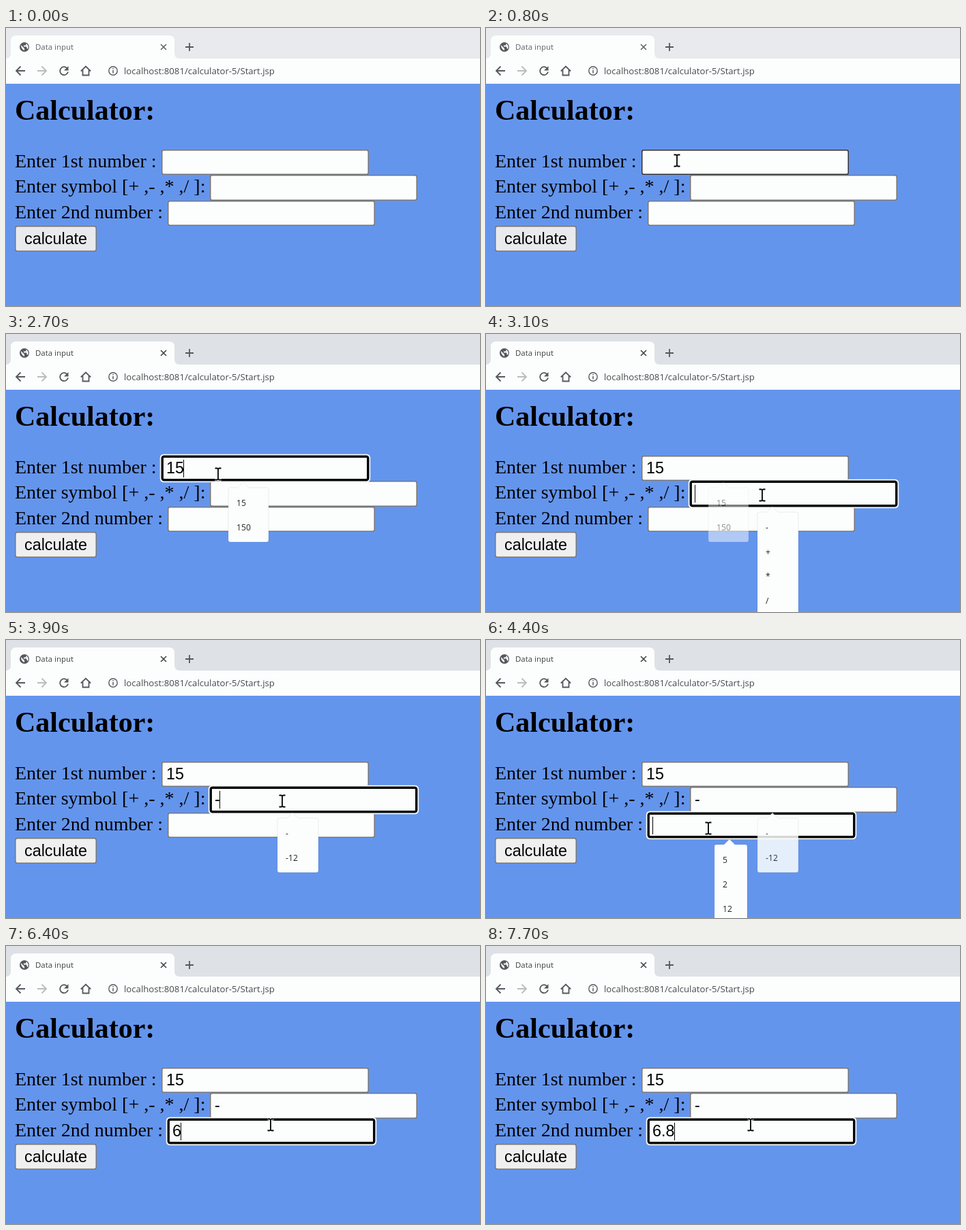
Animation, 695 px wide and 409 px high, one loop 8000 ms. Source, as an HTML page:

```html
<!DOCTYPE html>
<html lang="en">
<head>
<meta charset="utf-8">
<title>Data input</title>
<style>
  html, body { margin: 0; width: 100%; height: 100%; overflow: hidden; }
  svg { display: block; }
  text { white-space: pre; }
  .ui { font-family: "Open Sans", "Noto Sans", sans-serif; }
  .label { font: 28px "Liberation Serif", serif; }
  .heading { font: bold 42px "Liberation Serif", serif; }
  .control { font: 23.33px "Liberation Sans", sans-serif; }
  .item { font-size: 12.2px; fill: #222; }
  .icon { fill: none; stroke: #55585c; stroke-width: 1.8; }
</style>
</head>
<body>
<svg width="695" height="409" viewBox="0 0 695 409">
  <rect id="strip" width="695" height="46"/>
  <path d="M0 45Q7 45 7 37V19Q7 11 15 11H239Q247 11 247 19V37Q247 45 255 45H695V82H0Z" fill="#fcfefe"/>
  <rect y="82" width="695" height="327" fill="#6495ed"/>

  <circle cx="27" cy="28" r="7" fill="#55585c"/>
  <path d="M22 25l5 5v3q-5-2-5-8zM26 22.500h4l-1 3h-3v2h4l1 3h1.500q1-5-3-8z" fill="#fcfefe"/>
  <text id="title" class="ui" x="43" y="32" font-size="11.45">Data input</text>
  <g class="icon">
    <path id="close" d="M227 24l8 8m0-8l-8 8" stroke-width="1.6"/>
    <path d="M263 28h12m-6-6v12"/>
    <path d="M28 63H15m6.500-6.500L15 63l6.500 6.500"/>
    <path d="M46 63h13m-6.500-6.500L59 63l-6.500 6.500" stroke="#b9bbbe"/>
    <path d="M89.500 59A6 6 0 1 0 91 64.500"/>
    <path d="M91.500 56v6.500H85z" fill="#55585c" stroke="none"/>
    <path d="M109.800 63.500l7.200-7 7.200 7M112.500 62v7.500h9V62"/>
    <circle cx="157" cy="63" r="6.200" stroke-width="1.4"/>
    <path d="M157 62v4.500m0-7.500v1.600" stroke-width="1.5"/>
  </g>
  <text class="ui" x="173" y="68" font-size="13.2" fill="#46494d">localhost:8081/calculator-5/Start.jsp</text>

  <text class="heading" x="13" y="135">Calculator:</text>
  <g class="label">
    <text x="13" y="205">Enter 1st number :</text>
    <text x="13" y="242">Enter symbol [+ ,- ,* ,/ ]:</text>
    <text x="13" y="280">Enter 2nd number :</text>
  </g>
  <rect id="button" x="13.750" y="291.750" width="118.500" height="36.500" rx="3" stroke="#767676" stroke-width="1.5"/>
  <text class="control" x="27" y="318">calculate</text>
  <g id="live"></g>
</svg>
<script>
const $ = id => document.getElementById(id);
const LOOP = 8000, STEP = 100;

const fields = [
  { x: 228, y: 179, h: 37, menu: { x: 326, y: 226, tip: 348 } },
  { x: 299, y: 216, h: 38, menu: { x: 398, y: 262, tip: 420 } },
  { x: 237, y: 254, h: 37, menu: { x: 335, y: 301, tip: 357 } }
];

// Each action focuses or types: time, field, text, menu width, menu items
const actions = [
  [900, 0, '', 72, ['5', '-3', '2', '1000', '-10', '15']],
  [2300, 0, '1', 72, ['15', '150', '1000', '12', '1', '10']],
  [2600, 0, '15', 59, ['15', '150']],
  [3000, 1, '', 60, ['-', '+', '*', '/', '-12']],
  [3900, 1, '-', 60, ['-', '-12']],
  [4400, 2, '', 48, ['5', '2', '12', '15']],
  [6200, 2, '6', 0, []],
  [6800, 2, '6.', 0, []],
  [7700, 2, '6.8', 0, []]
].map(([time, field, text, width, items]) => ({ time, field, text, width, items }));

// Mouse stops: time, x, y
const path = [
  [200, 322, 409], [700, 280, 195], [2600, 280, 195], [3000, 405, 237],
  [4000, 405, 237], [4300, 326, 277], [4400, 326, 277], [4700, 388, 263], [LOOP, 388, 263]
];

function mouseAt(t) {
  const i = path.findIndex(p => p[0] > t);
  const [t0, x0, y0] = path[i - 1], [t1, x1, y1] = path[i];
  const k = (t - t0) / (t1 - t0);
  return { x: x0 + (x1 - x0) * k, y: y0 + (y1 - y0) * k };
}

const rect = (x, y, w, h, rx, style) =>
  `<rect x="${x}" y="${y}" width="${w}" height="${h}" rx="${rx}" ${style}/>`;

function drawField({ x, y, h }, text, focused, hovered) {
  const box = focused
    ? rect(x - 1.25, y - 1.25, 306.5, h + 2.5, 4.5, 'fill="#fcfefe" stroke="#fcfefe" stroke-width="2"') +
      rect(x + 1.2, y + 1.2, 301.6, h - 2.4, 2.5, 'fill="#fcfefe" stroke="#000" stroke-width="3.4"')
    : rect(x + .75, y + .75, 302.5, h - 1.5, 2.5,
        `fill="#fcfefe" stroke="${hovered ? '#333' : '#767676'}" stroke-width="1.5"`);
  return box + `<text class="control" x="${x + 7}" y="${y + 26}">${text}</text>`;
}

function drawMenu({ field, width, items }, opacity = 1) {
  if (!items.length) return '';
  const { x, y, tip } = fields[field].menu;
  const bottom = y + items.length * 36 + 8, right = x + width;
  const rows = items.map((s, i) =>
    `<text class="ui item" x="${x + 12}" y="${y + 27 + i * 36}">${s}</text>`).join('');
  return `<g opacity="${opacity}"><path d="M${x + 3} ${y}H${tip - 8}L${tip} ${y - 8}L${tip + 8} ${y}H${right - 3}
    q3 0 3 3V${bottom - 3}q0 3-3 3H${x + 3}q-3 0-3-3V${y + 3}q0-3 3-3z"
    fill="#fcfefe" stroke="#000" stroke-opacity=".07"/>${rows}</g>`;
}

function drawMouse({ x, y }, beam) {
  const shape = beam
    ? 'M-4.500-8.500h3L0-7.500l1.500-1h3M0-7.500v15M-4.500 8.500h3L0 7.500l1.500 1h3'
    : 'M0 0V17l4-3.800 2.600 6 2.600-1.200-2.500-5.700h5.500z';
  const style = beam
    ? ['fill="none" stroke="#fff" stroke-width="4"', 'fill="none" stroke="#000" stroke-width="1.8"']
    : ['fill="#fff" stroke="#000"'];
  return `<g transform="translate(${Math.round(x)} ${Math.round(y)})">` +
    style.map(s => `<path d="${shape}" ${s}/>`).join('') + '</g>';
}

function draw(t) {
  const done = actions.filter(a => a.time <= t);
  const now = done.at(-1), before = done.at(-2);
  const texts = ['', '', ''];
  done.forEach(a => texts[a.field] = a.text);

  $('strip').setAttribute('fill', now ? '#dee1e6' : '#e8eaed');
  $('title').setAttribute('fill', now ? '#3c4043' : '#5f6368');
  $('close').setAttribute('stroke', now ? '#3c4043' : '#5f6368');
  $('button').setAttribute('fill', now ? '#efefef' : '#e9eaed');

  const mouse = mouseAt(Math.max(t, 200));
  const over = f => t >= 300 && mouse.x > f.x && mouse.x < f.x + 304 && mouse.y > f.y && mouse.y < f.y + f.h;
  const order = [0, 1, 2].sort((a, b) => (now?.field === a) - (now?.field === b));
  let out = order.map(i => drawField(fields[i], texts[i], now?.field === i, over(fields[i]))).join('');

  if (now) {
    const age = t - now.time, f = fields[now.field];
    if (Math.floor((age + 60) / 530) % 2 === 0) {
      const advance = [...now.text].reduce((w, c) => w + 23.33 * (c === '.' ? .278 : c === '-' ? .333 : .556), 0);
      out += rect(Math.floor(f.x + 7 + advance), f.y + 6, 1, 26, 0, 'fill="#000"');
    }
    out += drawMenu(now);
    const closing = before && (before.field !== now.field || !now.items.length);
    if (closing && age < 200) out += drawMenu(before, age < 100 ? .85 : .5);
  }
  if (t >= 300) out += drawMouse(mouse, fields.some(over));
  $('live').innerHTML = out;
}

let last = -1;
function tick() {
  const t = Math.floor(performance.now() % LOOP / STEP) * STEP;
  if (t !== last) draw(last = t);
  requestAnimationFrame(tick);
}
tick();
</script>
</body>
</html>
```
